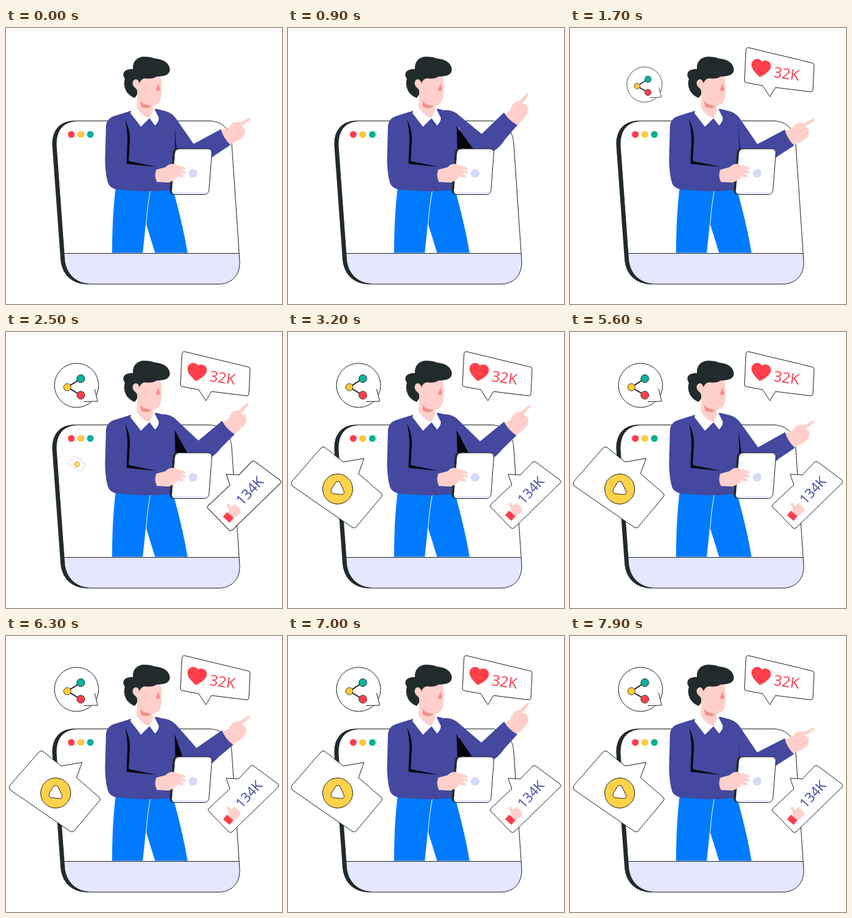
These frames come from a looping animation (450 px wide and 450 px high, 8000 ms). An HTML page:

```html
<!DOCTYPE html>
<html lang="en">
<head>
<meta charset="utf-8">
<title>Social reach</title>
<style>
html, body { margin: 0; width: 100%; height: 100%; overflow: hidden; background: #fff; }
svg { display: block; width: 100vw; height: 100vh; }
.line { fill: #fff; stroke: #1b2020; stroke-width: 1; stroke-linejoin: round; }
.none { fill: none; }
.dark { fill: #222b2b; }
.black { fill: #05050a; }
.knit { fill: #44489f; }
.jeans { fill: #007bff; }
.skin { fill: #ffd0cb; }
.blush { fill: #fa8f83; }
.red { fill: #fe3f4b; }
.yellow { fill: #ffc83d; }
.teal { fill: #0bb09c; }
.pale { fill: #e5e6ff; }
.white { fill: #fff; }
text { font-family: "Open Sans", "Noto Sans", sans-serif; font-weight: 500; }
</style>
</head>
<body>
<svg viewBox="0 0 450 450">
  <defs>
    <path id="pane" d="M118 151.500H330C352 151.500 366 164 368 188L381 380C382 403 368 417.500 346 417.500H140C115 417.500 98 402 95.500 378L82 192C81 165 95 151.500 118 151.500Z"/>
    <clipPath id="face"><use href="#pane"/></clipPath>
  </defs>

  <!-- window -->
  <path class="dark" d="M112 151H135V418H133C108 418 91 402 89 378L75.500 192C74 167 88 151 112 151Z"/>
  <use href="#pane" class="white"/>
  <g clip-path="url(#face)">
    <rect class="pale" x="80" y="367" width="310" height="60"/>
    <path class="line none" d="M80 367.500H390"/>
  </g>
  <use href="#pane" class="line none"/>
  <circle class="red" cx="106.500" cy="173.500" r="5.500"/>
  <circle class="yellow" cx="122" cy="173.500" r="5.500"/>
  <circle class="teal" cx="137.500" cy="173.500" r="5.500"/>

  <!-- legs -->
  <path class="jeans" d="M179 258C175 292 173 325 173 366.500H223L228 318L243 366.500H296C290 330 281 295 271 258Z"/>
  <path d="M235 266Q230 294 228.500 319" fill="none" stroke="#fff" stroke-width="1"/>

  <!-- torso -->
  <path class="knit" d="M207 134L178 143Q164 147 163 160L161.500 215Q162 238 166 252Q169 261 180 263Q225 269 271 264L277 215L278 150Q270 137 246 132Z"/>

  <!-- pointing arm -->
  <g id="arm">
    <g id="hand">
      <path class="skin" d="M350 169L362 165C367 157 374 154 381 157L394 151Q401 148 398 153.500L383 163Q391 165 389 172Q389 179 384 182Q377 187 371 189L360 194Z"/>
      <path d="M372 171Q378 170 384 164M376 178Q383 176 388 171" fill="none" stroke="#f9b5ad" stroke-width=".8"/>
    </g>
    <path class="knit" d="M250 134Q268 135 277 148L305 190L350 167Q353 181 365 193L338 210Q322 224 303 224Q286 222 276 215L272 165L250 170Z"/>
  </g>
  <path id="fold" class="black"/>

  <!-- head -->
  <path class="dark" d="M196 78C189 90 193 108 210 114L221 98L216 80Z"/>
  <path class="skin" d="M217 84C207 80 203 91 210 97Q213 99 214 103L213 131Q220 148 235 148Q241 142 241 134L238 128Q250 125 252 116C255 104 254 92 252 78L222 76Z"/>
  <path class="blush" d="M219 119Q226 127 238 127Q230 134 220 128Z"/>
  <path class="blush" d="M248.500 90L244.500 102Q248 104 251.500 101Z"/>
  <path class="dark" d="M194 83C187 73 195 66 207 67C206 53 216 45 230 47C238 47 242 50 244 50C259 51 268 60 267 69C266 77 257 79 246 79Q238 84 228 82Q220 82 218 90Q214 81 209 84Q205 87 206 94L198 90Z"/>
  <path class="white" d="M211 130Q203 133 203 139L220 161L234 147L243 159Q250 152 249 146L241 130L234 147Q222 144 215 132Z"/>

  <!-- resting arm -->
  <path class="black" d="M194 149Q203 168 202 182L200 217L246 226.500L196.500 221.500L198 184Q198 165 194 149Z"/>

  <!-- tablet -->
  <path class="dark" d="M279 196.500H290V271.500H274Q267 271 267 265L272 203Q273 197 279 196.500Z"/>
  <path class="line" d="M283 197H329Q336 197 335.500 204L331 264Q330 271.500 323 271.500H276Q269.500 271 270 265L275 204Q276 197 283 197Z"/>
  <path class="pale" d="M270.500 263Q271 268 277 268H323Q328 268 330.500 263.500Q329.500 271 323 271H276Q270 270.500 270.500 263Z"/>
  <circle cx="305" cy="237" r="7" fill="#d6d8f8"/>
  <path class="skin" d="M245 231L260 227Q267 220 275 222L291 227Q294 229 292 231L282 231L292 233Q295 236 291 237.500L281 236L289 240Q291 243 287 243.500L279 242Q277 248 265 252L246 251Q241 241 245 231Z"/>

  <!-- bubbles -->
  <g id="heart">
    <path class="line" d="M291 32L395 57Q398.500 58 398 61L396 101Q395.500 104.500 392 104L335 97L326 112L314 94L287 89Q284 88 284.500 85L287 35Q287.500 31.500 291 32Z"/>
    <path class="red" transform="translate(311 65.500) rotate(10)" d="M1 14.500C-8 9-16 3-16-5C-15-15-4-16 0-11C5-16 16-14 16-4C15 3 9 9 1 14.500Z"/>
    <text class="red" transform="translate(331 80) rotate(8)" font-size="24">32K</text>
  </g>
  <g id="share">
    <circle class="line" cx="115" cy="87" r="36"/>
    <path class="line" d="M144.500 93L149.500 113L127 113.500"/>
    <path d="M122 76L100 90L122 103" fill="none" stroke="#1b2020" stroke-width="2"/>
    <g stroke="#1b2020" stroke-width=".8">
      <circle class="teal" cx="122" cy="76" r="6.500"/>
      <circle class="yellow" cx="100" cy="90" r="6"/>
      <circle class="red" cx="122" cy="103" r="6.500"/>
    </g>
  </g>
  <g id="likes">
    <path class="line" d="M331 281L365 249L359 232L379 233L399 212Q402 210 404 212L443 241Q446 243 444 246L369 319Q366 322 363 319L331 286Q328 284 331 281Z"/>
    <g transform="translate(367 293) rotate(-48)">
      <path class="skin" d="M-3 7V-3L2-7L4-14Q8-16 8-10L7-6H13Q16-5 14-2Q16 0 14 3Q15 5 13 7Q13 10 9 10H2Z"/>
      <rect class="red" x="-13" y="-6" width="10" height="14" rx="1"/>
    </g>
    <text transform="translate(384 282) rotate(-47)" font-size="22" fill="#44489f">134K</text>
  </g>
  <g id="play">
    <path class="line" d="M6 244L54 189Q57 186 60 188L90 212L124 206L115 231L152 263Q155 266 152 269L111 318Q108 321 104 318L7 251Q4 248 6 244Z"/>
    <circle cx="81" cy="256" r="24.500" fill="#ffd249" stroke="#1b2020"/>
    <path class="line" d="M77 246Q81 241 85 246L91 259Q93 265 87 265L74 263.500Q68 262 71 256Z"/>
  </g>
</svg>
<script>
const LOOP = 8000, STEP = 100, SWING = 2000, LOW = 1830;
const $ = id => document.getElementById(id);

// each bubble grows from its tail: id, start time, anchor x, y
const pops = [
  ["heart", 900, 325, 112],
  ["share", 1400, 147, 113],
  ["likes", 1900, 359, 232],
  ["play", 2400, 124, 206]
];

function popScale(ms) {
  const peak = 1.16, rise = 400, settle = 300;
  if (ms <= 0) return 0;
  if (ms < rise) return peak * (ms / rise) ** 1.3;
  const k = Math.min(1, (ms - rise) / settle);
  return 1 + (peak - 1) * (1 + Math.cos(Math.PI * k)) / 2;
}

function draw(t) {
  for (const [id, start, x, y] of pops) {
    const s = popScale(t - start), el = $(id);
    el.style.visibility = s ? "visible" : "hidden";
    el.setAttribute("transform", `translate(${x} ${y}) scale(${s}) translate(${-x} ${-y})`);
  }
  const lift = (1 - Math.cos(2 * Math.PI * (t - LOW) / SWING)) / 2;
  $("arm").setAttribute("transform", `rotate(${-17 * lift} 252 145)`);
  $("hand").setAttribute("transform", `rotate(${-5 * lift} 372 172)`);
  // the gap under the arm opens as it lifts
  $("fold").setAttribute("d", `M275 160L276 198H${276 + 27 * lift}Z`);
}

const begin = performance.now();
function tick() {
  const t = (performance.now() - begin) % LOOP;
  draw(Math.floor(t / STEP) * STEP);
  requestAnimationFrame(tick);
}
draw(0);
requestAnimationFrame(tick);
</script>
</body>
</html>
```
